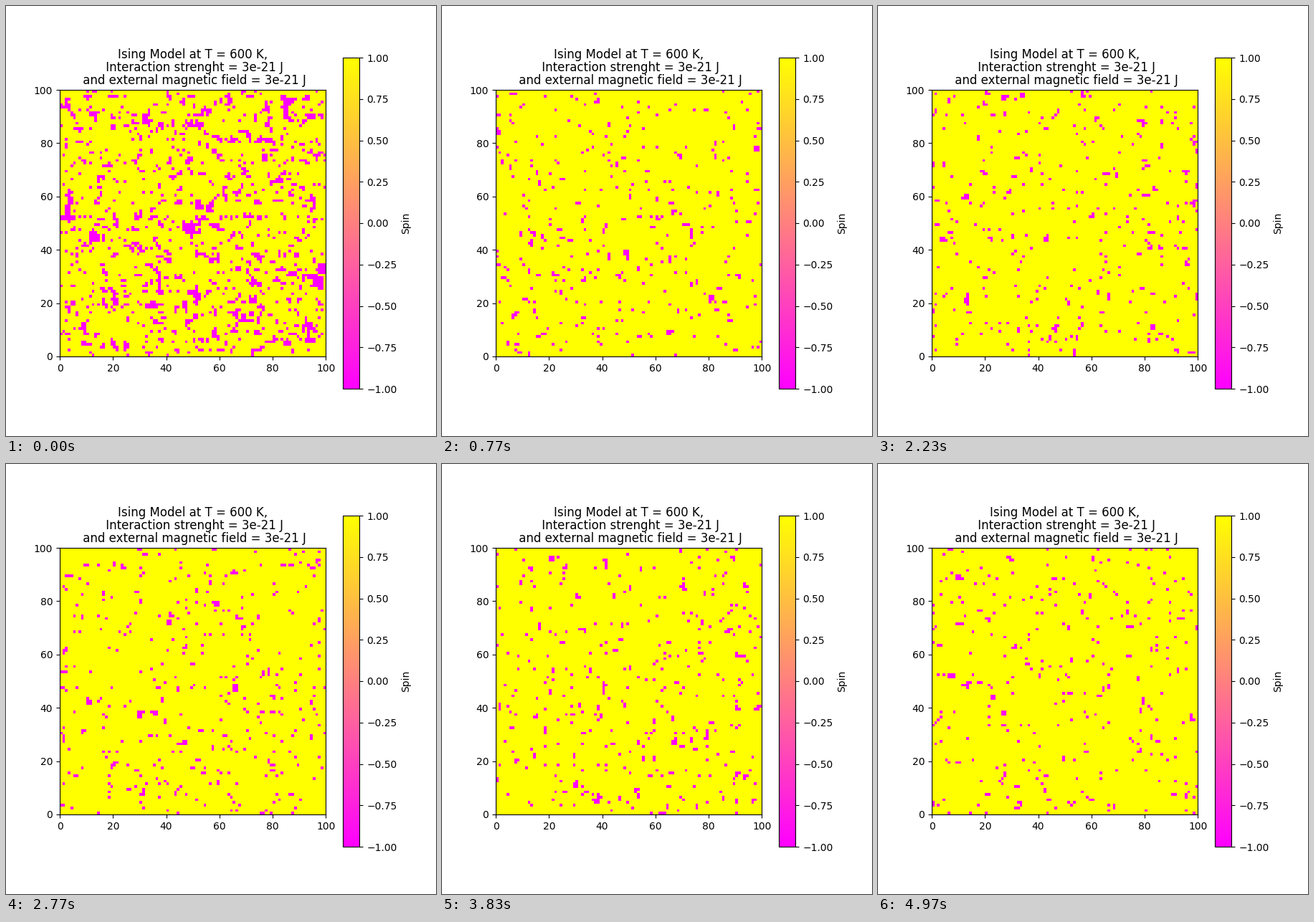
Write a matplotlib script that moves like this. It is 600 px wide and 600 px high and loops after 5000 ms.

```python
import matplotlib.pyplot as plt
import numpy as np
from matplotlib.animation import FuncAnimation

N = 100
SIZE = 600
FRAMES = 150
LOOP_MS = 5000
T = 600
J = 3e-21
H = 3e-21
BETA = 1 / (1.380649e-23 * T)

rng = np.random.default_rng(12)
parity = np.indices((N, N)).sum(axis=0) % 2


def visit(spins, rate):
    """Metropolis trial on a random share of the sites, one sublattice at a time."""
    for color in (0, 1):
        around = sum(np.roll(spins, s, axis) for s in (1, -1) for axis in (0, 1))
        cost = 2 * spins * (J * around + H)
        accept = rng.random((N, N)) < np.exp(-BETA * np.maximum(cost, 0))
        chosen = (parity == color) & (rng.random((N, N)) < rate)
        spins = np.where(chosen & accept, -spins, spins)
    return spins


def sweep(spins, parts=4):
    for _ in range(parts):
        spins = visit(spins, 1 - np.exp(-1 / parts))
    return spins


def simulate():
    spins = rng.choice([-1, 1], size=(N, N))
    # relax the random lattice until most spins follow the field
    while (spins < 0).mean() > 0.155:
        spins = visit(spins, 0.05)
    states = [spins]
    while len(states) < FRAMES:
        states.append(sweep(states[-1]))
    return states


states = simulate()

fig, ax = plt.subplots(figsize=(SIZE / 100, SIZE / 100), dpi=100)
mesh = ax.pcolormesh(states[0], cmap="spring", vmin=-1, vmax=1)
ax.set_title(
    f"Ising Model at T = {T} K,\n Interaction strenght = {J} J"
    f"\n and external magnetic field = {H} J",
    linespacing=1.0,
)
fig.colorbar(mesh, ax=ax, label="Spin")
# lattice box in pixels: left, bottom, width, height
ax.set_position(np.array([75, 111, 371.4, 372]) / SIZE)


def update(i):
    mesh.set_array(states[i])
    return (mesh,)


anim = FuncAnimation(fig, update, frames=FRAMES, interval=LOOP_MS / FRAMES, repeat=True)
plt.show()
```
